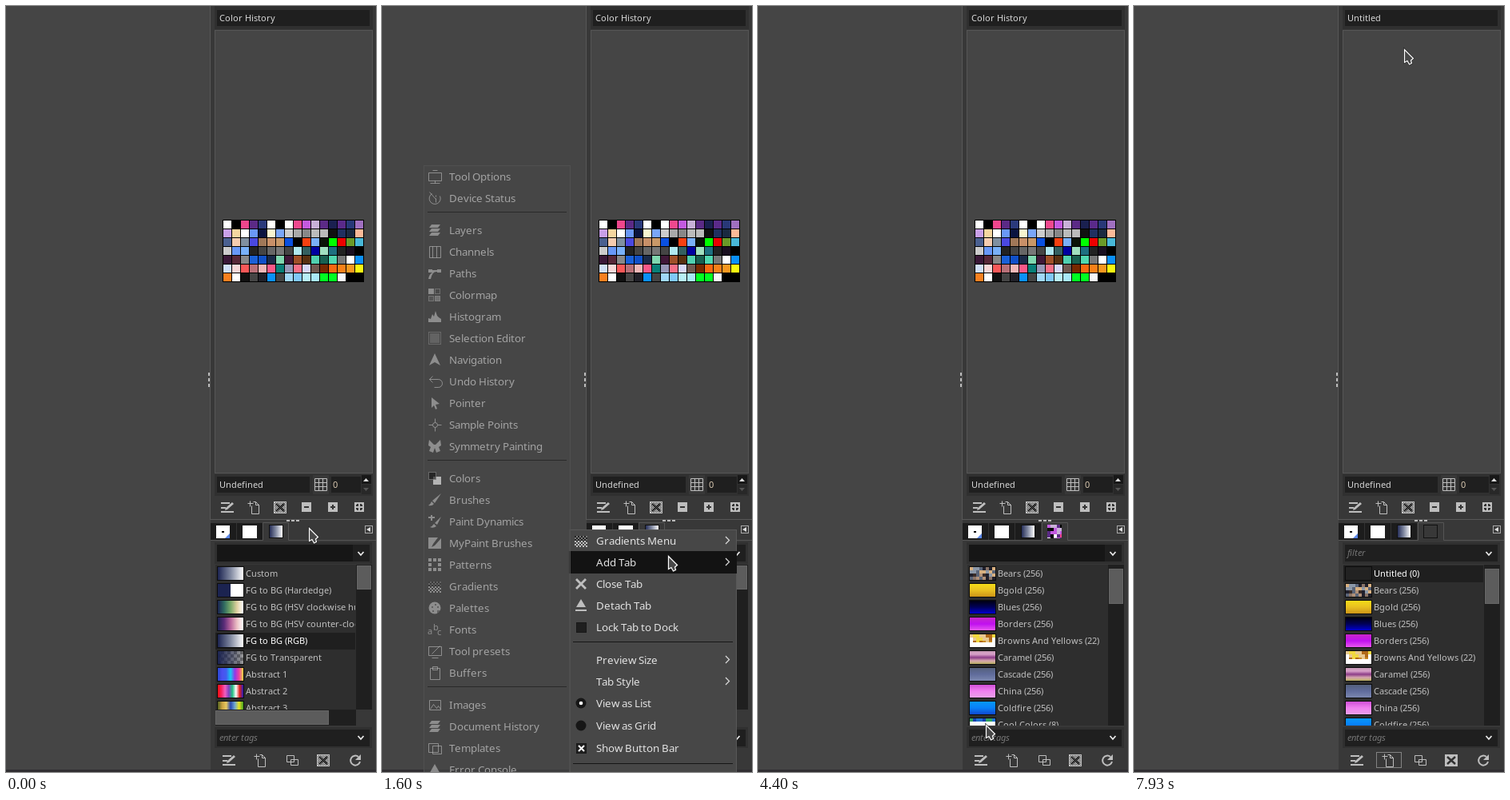
An HTML page with a canvas for the animation above (8 s loop, 463 by 957 pixels).

```html
<!DOCTYPE html>
<html>
<head>
<meta charset="utf-8">
<style>
html, body { margin: 0; width: 100%; height: 100%; overflow: hidden; background: #454545; }
canvas { display: block; }
</style>
</head>
<body>
<canvas id="stage" width="463" height="957"></canvas>
<script>
const ctx = document.getElementById('stage').getContext('2d');
const LOOP = 8000;
const BG = '#454545', DOCK = '#383838', DARK = '#1f1f1f', LIST = '#2e2e2e', ICON = '#bebebe', NAVY = '#1b2350';
const SMALL = '11px "Noto Sans", sans-serif';
const ITALIC = 'italic ' + SMALL;
const LARGE = '13.33px "Noto Sans", sans-serif';

// [time, x, y] of the pointer tip
const POINTER = [
  [0, 379, 652], [70, 379, 652], [600, 451, 652], [1099, 451, 652],
  [1100, 385, 676], [1170, 385, 676], [1500, 362, 686], [1670, 355, 687], [2029, 355, 687],
  [2030, 331, 686], [2230, 331, 686], [2670, 134, 715], [3030, 113, 751], [3670, 113, 751],
  [4400, 285, 898], [4530, 305, 926], [4669, 305, 926], [4670, 312, 942], [4830, 314, 946],
  [5130, 315, 948], [7330, 315, 948], [7630, 362, 560], [7930, 338, 54], [8000, 338, 54]
];

const SWATCHES = [
  'fff 000 f0468c 5b2a86 2a3a7c fff 000 fff f0488e c45ae0 c8b0d8 5b2a86 1a2050 5a2a8a 283878 a070c0',
  'c9a0e8 f5d6a0 fff 6a98f8 0a1440 f8f5d0 7aa6f8 ccc aaa 888 bbb bbb 111 203060 1a2a40 fcba98',
  '4a6090 f5ccb0 8090a0 4a48e0 a07858 c89068 c89868 0a50e0 000 f84010 7ab0f8 0a1408 0f0 e00 6a9a28 48b8d8',
  'ccc 6898f8 78b0f8 222 444 666 777 444 b0e8f0 346060 0000a0 a0e0c0 1e7080 222 1a1020 000',
  '3a1838 582838 888 1a60d8 1050c8 1a2a48 80d8b0 401838 a05028 583010 50d0b0 186050 50d8b0 777 fff 0a90f8',
  'd0e0f8 f8d8d8 f85858 b87078 f0b8b8 f85888 088078 9898b8 f87088 d8d8f8 705850 782800 f86810 f88018 f89820 f8f810',
  'f88020 fff 111 444 202028 0a90f8 444 a0d8f8 80c8f8 b8f0f8 a8e8f8 0f2 0f2 f8f8f8 000 000'
].map(row => row.split(' '));

// name, style (h: across, v: down, m: mosaic), colours
const GRADIENTS = [
  ['Custom', 'h', NAVY, '#8088a0', '#fff'],
  ['FG to BG (Hardedge)', 'split', NAVY, '#fff'],
  ['FG to BG (HSV clockwise hue)', 'h', NAVY, '#2f6a60', '#77a868', '#e0d0a0', '#fff'],
  ['FG to BG (HSV counter-clockwise)', 'h', NAVY, '#5a2c78', '#b8649c', '#ecc0c4', '#fff'],
  ['FG to BG (RGB)', 'h', NAVY, '#8088a0', '#fff'],
  ['FG to Transparent', 'alpha', NAVY, '#1b235000'],
  ['Abstract 1', 'h', '#2848d0', '#4a50f0', '#4060f0', '#18c8f0', '#9038e8', '#f040a0', '#f0e040'],
  ['Abstract 2', 'h', '#f01010', '#f82060', '#f060c0', '#8040c0', '#20c080', '#fff', '#e02020', '#2020c0'],
  ['Abstract 3', 'h', '#506020', '#c8a040', '#e8c860', '#2848b0', '#70a8d0', '#e8e020', '#40a020']
];
const PALETTES = [
  ['Bears (256)', 'm', '#3a2c28', '#8a7468', '#b09078', '#5a6478', '#d8b080', '#20202c', '#8c98a8'],
  ['Bgold (256)', 'v', '#f4dc18', '#e8c020', '#cc9418'],
  ['Blues (256)', 'v', '#000010', '#000058', '#0000d0'],
  ['Borders (256)', 'v', '#c828c8', '#c010f0', '#e858f0'],
  ['Browns And Yellows (22)', 'blocks', '#e8b818', '#b06818', '#f0d840', '#c88820', '#e8c890'],
  ['Caramel (256)', 'v', '#c89cb8', '#d8a0c8', '#8c3c88', '#d8a8b0', '#b8b060'],
  ['Cascade (256)', 'v', '#54607c', '#606c9c', '#7c88b0'],
  ['China (256)', 'v', '#d050d8', '#f080f0', '#e8a0e8'],
  ['Coldfire (256)', 'v', '#0898f8', '#0880f8', '#1048d0'],
  ['Cool Colors (8)', 'strip', '#1840b0', '#2070d0', '#101840', '#30a060']
];

// Menu entries: [label, centre y, icon, has submenu]
const MENU = [
  ['Gradients Menu', 668, 'gradient', true], ['Add Tab', 695, '', true], ['Close Tab', 722, 'close'],
  ['Detach Tab', 749, 'detach'], ['Lock Tab to Dock', 776, 'box'], ['Preview Size', 817, '', true],
  ['Tab Style', 844, '', true], ['View as List', 871, 'radioOn'], ['View as Grid', 899, 'radio'],
  ['Show Button Bar', 927, 'boxOn']
];
const column = (y, text) => text.split(',').map((item, i) => {
  const [label, icon] = item.split(':');
  return [label, y + i * 27, icon];
});
const SUBMENU = [
  ...column(213, 'Tool Options:easel,Device Status:info'),
  ...column(280, 'Layers:layers,Channels:channels,Paths:paths,Colormap:colormap,Histogram:histogram,Selection Editor:selection,Navigation:navigation,Undo History:undo,Pointer:pointer,Sample Points:target,Symmetry Painting:butterfly'),
  ...column(590, 'Colors:colors,Brushes:brush,Paint Dynamics:dynamics,MyPaint Brushes:mypaint,Patterns:patterns,Gradients:gradient,Palettes:palette,Fonts:fonts,Tool presets:preset,Buffers:clipboard'),
  ...column(873, 'Images:image,Document History:layers,Templates:template,Error Console:warning')
];

const STROKES = {
  create: 'M-3-2V8H6V-3L2-7H-1M2-7V-3H6M-8-5H-1M-5-8V-1',
  copy: 'M-7-6H2V2H-7zM-2-1H7V6H-2z',
  easel: 'M-8-5H8V5H-8zM-3-8H3M-6 8H6M0 5V8',
  info: 'M-4-6A7 7 0 1 0 6-3M-7-8L1 1M1 0V5M1-4V-2',
  channels: 'M-7-7H7V7H-7zM-3-7V7M2-7V7',
  undo: 'M-7-3H4A5 5 0 0 1 4 7H-1M-3-7L-7-3L-3 1',
  target: 'M-8 0H-3M3 0H8M0-8V-3M0 3V8M-3 0A3 3 0 1 0 3 0A3 3 0 1 0-3 0',
  preset: 'M-8-6H8V5H-8zM-4 3L6-7M-4 8H4',
  clipboard: 'M-6-6H6V8H-6zM-3-8H3V-4H-3z',
  image: 'M-7-6H7V6H-7zM-6 5L-2-1L2 4L4 1L7 5',
  template: 'M-8-6H4V5H-8zM-3-3H8V7H-3z'
};
const FILLS = {
  edit: 'M-8-6H3V-4H-8zM-8 0H-2V2H-8zM-8 5H8V7H-8zM6-6L8-4L0 3L-3 4L-2 1z',
  close: 'M-7-5L-5-7L0-2L5-7L7-5L2 0L7 5L5 7L0 2L-5 7L-7 5L-2 0z',
  detach: 'M0-8L6 2H-6zM-7 5H7V7H-7z',
  layers: 'M-4-7H7L4-3H-7zM-4-2H7L4 2H-7zM-4 3H7L4 7H-7z',
  paths: 'M-8-5H-3V-4H3V-5H8V-1H3V-2Q-3-3-5 7H-8Q-7 1-3-1H-8z',
  histogram: 'M-8 7V2L-5 3L-3-3L-1 0L1-7L3-1L5 1L8 3V7z',
  navigation: 'M0-8L7 7L0 3L-7 7z',
  pointer: 'M-4-7L6 1L1 2L3 7L1 8L-1 3L-4 6z',
  butterfly: 'M-1-2L-7-8L-8-1L-5 1L-7 6L-2 8L0 2L2 8L7 6L5 1L8-1L7-8L1-2z',
  brush: 'M8-8L0 4L-3 1zM-4 2L-1 5Q-3 8-8 7Q-5 5-4 2z',
  dynamics: 'M-8-6H-5V-8H-3V-6H0V-4H-3V-1H-5V-4H-8zM8-6L3 4L0 2zM-1 3L2 6Q-2 9-6 7Q-3 6-1 3z',
  mypaint: 'M-8-7H4L-2 1L-4 5L0 3L8-6V7H-8z',
  warning: 'M0-7L8 7H-8z'
};

function rect(x, y, w, h, color) {
  ctx.fillStyle = color;
  ctx.fillRect(x, y, w, h);
}
function frame(x, y, w, h, color) {
  ctx.strokeStyle = color;
  ctx.lineWidth = 1;
  ctx.strokeRect(x + .5, y + .5, w - 1, h - 1);
}
// Glyph advances snap to whole pixels, as in hinted interface text.
function text(label, x, y, color = '#d6d6d6', font = SMALL) {
  ctx.font = font;
  ctx.fillStyle = color;
  const baseline = y + (font === LARGE ? 5 : 4);
  for (const glyph of label) {
    ctx.fillText(glyph, x, baseline);
    x += Math.round(ctx.measureText(glyph).width);
  }
}
function line(path, color = ICON, width = 1.3) {
  ctx.strokeStyle = color;
  ctx.lineWidth = width;
  ctx.stroke(new Path2D(path));
}
function fill(path, color = ICON) {
  ctx.fillStyle = color;
  ctx.fill(new Path2D(path));
}
function disc(r, color) {
  ctx.beginPath();
  ctx.arc(0, 0, r, 0, 7);
  ctx.fillStyle = color;
  ctx.fill();
}
function checker(x, y, w, h, size, color) {
  for (let j = 0; j < h / size; j++)
    for (let i = j % 2; i < w / size; i += 2) rect(x + i * size, y + j * size, size, size, color);
}
function tile(glyph) {
  rect(-6, -6, 12, 12, ICON);
  line(glyph, '#333', 2);
}

const SPECIAL = {
  minus: () => tile('M-3 0H3'),
  plus: () => tile('M-3 0H3M0-3V3'),
  fit: () => tile('M-4-2H-1M1-2H4M-4 2H-1M1 2H4M-2-4V-1M2-4V-1M-2 1V4M2 1V4'),
  remove: () => { rect(-8, -7, 16, 15, ICON); line('M-5-4L5 5M5-4L-5 5', '#303030', 2.4); },
  removeOff: () => { checker(-8, -7, 16, 15, 1, '#e8e8e8'); line('M-5-4L5 5M5-4L-5 5', '#303030', 2.4); frame(-8, -7, 16, 15, ICON); },
  refresh: () => { line('M4-4A6 6 0 1 0 6 2', ICON, 2); fill('M7-7V0H0z'); },
  box: () => { rect(-6, -6, 13, 13, DARK); frame(-6, -6, 13, 13, '#181818'); },
  boxOn: () => { SPECIAL.box(); line('M-3-3L4 4M4-3L-3 4', '#fff', 2); },
  radio: () => disc(6.5, '#161616'),
  radioOn: () => { SPECIAL.radio(); disc(2.3, '#fff'); },
  gradient: () => { rect(-8, -6, 16, 5, '#777'); checker(-8, -6, 16, 6, 2, '#222'); checker(-8, 0, 16, 8, 2, ICON); },
  colormap: () => [[-8, -8, 1], [0, -8, .4], [-8, 1, .5], [0, 1, .75]].forEach(([x, y, a]) =>
    { rect(x, y, 7, 7, `rgb(${190 * a},${190 * a},${190 * a})`); frame(x, y, 7, 7, '#888'); }),
  selection: () => { rect(-6, -6, 12, 12, '#777'); ctx.setLineDash([1, 1]); frame(-8, -8, 16, 16, ICON); ctx.setLineDash([]); },
  colors: () => { rect(-2, -2, 10, 10, '#fff'); rect(-8, -8, 10, 10, '#111'); frame(-8, -8, 10, 10, '#999'); },
  patterns: () => [-8, -2, 4].forEach(x => [-8, -2, 4].forEach(y => { if (x + 2 || y + 2) rect(x, y, 4, 4, ICON); })),
  palette: () => { disc(7.5, ICON); [[-4, -2], [0, -5], [3, -2], [-3, 3]].forEach(([x, y]) => rect(x, y, 2, 2, '#444')); rect(3, 3, 5, 5, BG); },
  fonts: () => { text('a', -9, 2, ICON); text('b', -2, -3, ICON); text('c', 3, 3, ICON); }
};

function icon(name, x, y) {
  ctx.save();
  ctx.translate(x, y);
  if (SPECIAL[name]) SPECIAL[name]();
  else if (STROKES[name]) {
    ctx.translate(.5, .5);
    line(STROKES[name], ICON, 1);
  } else if (FILLS[name]) fill(FILLS[name]);
  ctx.restore();
}

function ramp(x, y, w, h, colors, down) {
  const g = ctx.createLinearGradient(x, y, down ? x : x + w, down ? y + h : y);
  colors.forEach((c, i) => g.addColorStop(i / (colors.length - 1), c));
  rect(x, y, w, h, g);
}
function mosaic(x, y, w, h, size, colors) {
  let seed = 7;
  for (let j = 0; j < h; j += size)
    for (let i = 0; i < w; i += size) {
      seed = (seed * 16807) % 2147483647;
      rect(x + i, y + j, Math.min(size, w - i), Math.min(size, h - j), colors[(seed >> 8) % colors.length]);
    }
}

function thumbnail(style, colors, x, y) {
  const w = 32, h = 16;
  rect(x - 1, y - 1, w + 2, h + 2, '#0c0c0c');
  if (style === 'split') {
    rect(x, y, 16, h, colors[0]);
    rect(x + 16, y, 16, h, colors[1]);
  } else if (style === 'alpha') {
    rect(x, y, w, h, '#666');
    checker(x, y, w, h, 4, '#999');
    ramp(x, y, w, h, colors);
  } else if (style === 'm') {
    mosaic(x, y, w, h, 4, colors);
  } else if (style === 'blocks' || style === 'strip') {
    rect(x, y, w, h, '#fff');
    mosaic(x, y, w, 4, 4, colors);
    if (style === 'blocks') mosaic(x + 4, y + 4, 24, 6, 4, colors);
  } else {
    ramp(x, y, w, h, colors, style === 'v');
  }
}

function chevronDown(y) {
  line(`M440.5 ${y - 2}l3.5 4l3.5-4`, '#e8e8e8', 1.8);
}

function drawEditor(created) {
  rect(261, 0, 198, 29, '#303030');
  rect(264, 5, 191, 20, DARK);
  text(created ? 'Untitled' : 'Color History', 267, 15);
  rect(261, 30, 198, 553, BG);
  frame(261, 30, 198, 554, '#555');
  if (!created) {
    rect(271, 267, 177, 78, '#000');
    SWATCHES.forEach((row, j) => row.forEach((c, i) => rect(272 + i * 11, 268 + j * 11, 10, 10, '#' + c)));
  }
  rect(261, 585, 198, 27, '#303030');
  rect(264, 588, 116, 20, DARK);
  text('Undefined', 267, 598);
  rect(384, 586, 20, 24, DOCK);
  line('M386.5 590.5h15v15h-15zM391.5 590v16M396.5 590v16M386 595.5h16M386 600.5h16', ICON, 1);
  rect(407, 588, 37, 20, DARK);
  text('0', 409, 598, '#d8c8b0');
  rect(445, 586, 12, 11, '#181818');
  rect(445, 598, 12, 12, '#282828');
  fill('M447 594L450.500 590L454 594z', '#ddd');
  fill('M447 602L450.500 606L454 602z', '#555');
  ['edit', 'create', 'removeOff', 'minus', 'plus', 'fit'].forEach((name, i) => icon(name, 277 + i * 33, 626));
}

function drawTabs(palettes, created) {
  const x = palettes ? 355 : 321;
  rect(256, 646, x - 256, 21, '#1c1c1c');
  for (let divider = 288; divider < x; divider += 33) rect(divider, 646, 1, 21, '#333');
  rect(x, 645, 33, 24, DOCK);
  line(`M256 667.5H${x + .5}V645.5H${x + 32.5}V667.5H463`, '#555', 1);
  rect(263, 649, 17, 16, '#fff');
  rect(270, 656, 3, 2, '#000');
  fill('M280 659V665H274z', '#5a86e8');
  rect(296, 649, 18, 16, '#fff');
  ramp(329, 648, 17, 17, [NAVY, '#8088a0', '#fff']);
  frame(329, 648, 18, 17, '#111');
  if (palettes) {
    if (!created) mosaic(362, 648, 18, 17, 4, ['#fff', '#111', '#f0468c', '#5b2a86', '#c45ae0', '#000', '#c8b0d8']);
    else frame(362, 648, 18, 17, '#111');
  }
  frame(449, 649, 10, 10, '#aaa');
  fill('M456 651V657L451 654z', '#ddd');
}

function drawList(items, selected, bottom) {
  rect(262, 698, 176, bottom - 698, LIST);
  ctx.save();
  ctx.beginPath();
  ctx.rect(262, 698, 175, bottom - 698);
  ctx.clip();
  items.forEach(([label, style, ...colors], i) => {
    const y = 709 + i * 21;
    if (i === selected) rect(262, y - 10, 176, 21, DARK);
    thumbnail(style, colors, 265, y - 8);
    text(label, 300, y, i === selected ? '#fff' : '#c0c0c0');
  });
  ctx.restore();
  rect(438, 698, 20, bottom - 698, DARK);
}

function drawBrowser(t) {
  const palettes = t >= 3470, created = t >= 6270, placeholder = t >= 6170;
  drawTabs(palettes, created);
  rect(261, 670, 197, 27, '#303030');
  rect(264, 673, 170, 21, placeholder ? DARK : '#161616');
  rect(434, 673, 21, 21, DARK);
  chevronDown(684);
  if (placeholder) text('filter', 267, 683, '#767676', ITALIC);
  else if (palettes && (t - 3540 + 1130) % 1130 < 760) rect(267, 675, 1, 16, '#e8e8e8');

  if (palettes) {
    const items = created ? [['Untitled (0)', 'h', '#222', '#222'], ...PALETTES] : PALETTES;
    drawList(items, created ? 0 : -1, 899);
    rect(439, 703, 18, 44, '#5c5c5c');
    frame(439, 703, 18, 44, '#666');
  } else {
    drawList(GRADIENTS, 4, 879);
    rect(439, 699, 18, 30, '#5c5c5c');
    frame(439, 699, 18, 30, '#666');
    rect(262, 879, 176, 20, DARK);
    rect(262, 880, 142, 18, '#5c5c5c');
    frame(262, 880, 142, 18, '#666');
  }
  rect(261, 901, 197, 26, '#303030');
  rect(264, 904, 191, 21, DARK);
  text('enter tags', 267, 914, '#767676', ITALIC);
  chevronDown(914);

  if (t >= 4670 && t < 7370) {
    rect(302, 930, 34, 25, '#161616');
    frame(301, 929, 36, 26, '#2a2a2a');
  }
  if (placeholder) {
    ctx.setLineDash([1, 1]);
    frame(303, 932, 32, 20, '#ccc');
    ctx.setLineDash([]);
  }
  ['edit', 'create', 'copy', created ? 'remove' : 'removeOff', 'refresh']
    .forEach((name, i) => icon(name, Math.round(279 + i * 39.4), 942));
}

function drawMenu(items, x, y, w, separators, active, alpha) {
  if (!alpha) return;
  ctx.globalAlpha = alpha;
  rect(x, y, w, 957 - y, '#474747');
  frame(x, y, w, 960 - y, '#585858');
  separators.forEach(sy => rect(x + 5, sy, w - 10, 1, '#161616'));
  items.forEach(([label, cy, name, more], i) => {
    if (i === active) rect(x, cy - 14, w, 28, '#131313');
    icon(name, x + (items === MENU ? 15 : 14), cy);
    text(label, x + (items === MENU ? 34 : 32), cy, '#e2e2e2', LARGE);
    if (more) line(`M${x + 196} ${cy - 5}l4.500 4.500l-4.500 4.500`, '#ddd', 1.2);
  });
  ctx.globalAlpha = 1;
}

function drawMenus(t, [px, py]) {
  const opacity = (start, end) =>
    t >= 3670 ? 0 : t >= 3630 ? .09 : t >= 3470 ? .14 : Math.max(0, Math.min(1, (t - start) / (end - start)));
  const rowAt = items => items.findIndex(([, y]) => py >= y - 13 && py < y + 14);
  const inSubmenu = t > 1670 && px < 236;
  const active = inSubmenu ? 1 : px < 444 ? rowAt(MENU) : -1;
  drawMenu(MENU, 234, 654, 210, [794, 946], active, opacity(690, 830));
  drawMenu(SUBMENU, 52, 199, 184, [257, 567, 850], inSubmenu ? rowAt(SUBMENU) : -1, opacity(1500, 1670));
}

function pointerAt(t) {
  const i = POINTER.findIndex(key => key[0] > t);
  const [t0, x0, y0] = POINTER[i - 1], [t1, x1, y1] = POINTER[i];
  const p = (t - t0) / (t1 - t0);
  return [Math.round(x0 + (x1 - x0) * p), Math.round(y0 + (y1 - y0) * p)];
}

function drawPointer([x, y]) {
  ctx.save();
  ctx.translate(x, y);
  const shape = 'M.5.5V16.500L4 14.500L6.500 19L9.500 17.500L8.500 14L11.500 11.500z';
  line(shape, '#222', 2.4);
  fill(shape, '#484848');
  line(shape, '#fff', 1.2);
  ctx.restore();
}

function render(now) {
  const t = now % LOOP;
  const pointer = pointerAt(t);
  rect(0, 0, 463, 957, BG);
  rect(256, 0, 207, 957, DOCK);
  rect(255, 0, 1, 642, '#575757');
  rect(255, 641, 208, 1, '#575757');
  for (let i = 0; i < 3; i++) rect(253, 458 + i * 7, 2, 4, '#bbb');
  for (let i = 0; i < 3; i++) rect(351 + i * 6, 642, 4, 2, '#bbb');
  drawEditor(t >= 6270);
  drawBrowser(t);
  rect(0, 954, 463, 3, '#302e32');
  drawMenus(t, pointer);
  drawPointer(pointer);
  requestAnimationFrame(render);
}
requestAnimationFrame(render);
</script>
</body>
</html>
```
